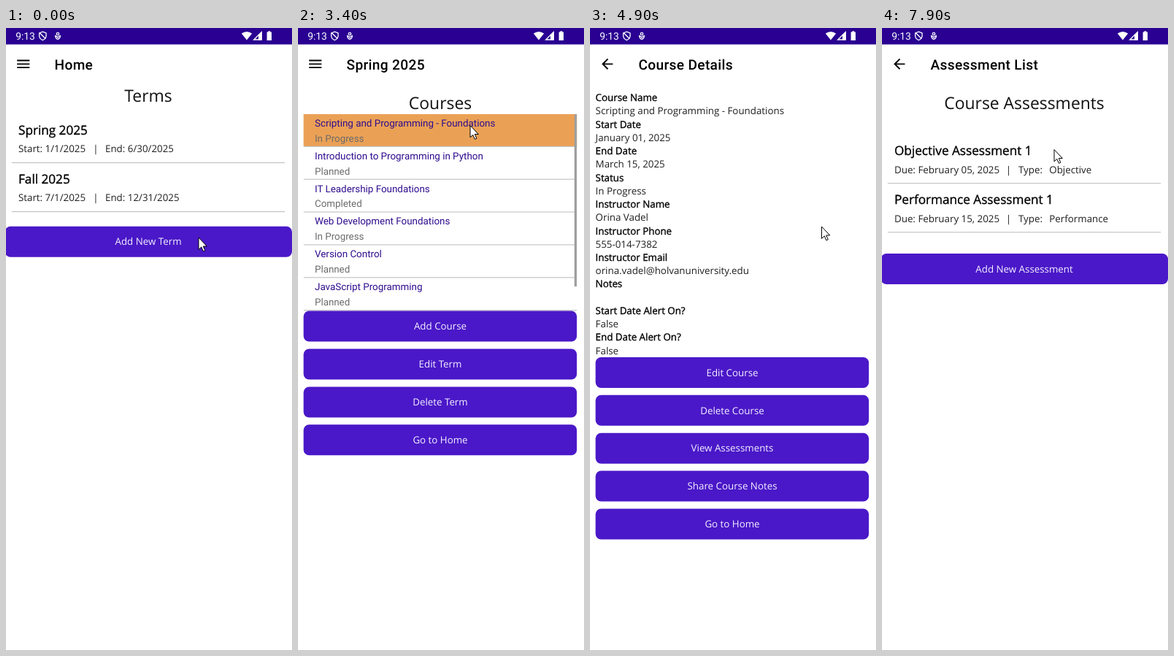
Write an HTML page that moves like this. It is 392 px wide and 852 px high and loops after 8 s.

```html
<!DOCTYPE html>
<html lang="en">
<head>
<meta charset="utf-8">
<title>Course planner</title>
<style>
  html, body { margin: 0; width: 100%; height: 100%; overflow: hidden; background: #fff; }
  svg { display: block; width: 100%; height: 100%; }
  text { font: 13.34px "Open Sans", sans-serif; fill: #1f1f1f; text-rendering: geometricPrecision; white-space: pre; }
  .bar { font: 500 19.1px Roboto, sans-serif; letter-spacing: .35px; fill: #000; }
  .head { font-size: 22.9px; fill: #111; }
  .item { font-size: 17.15px; }
  .item, .label { fill: #000; stroke: #000; stroke-width: .35px; }
  .btn { fill: #f4f0ff; }
  .course { font: 13.4px Roboto, sans-serif; fill: #2f0c8e; }
  .state { font: 13.34px Roboto, sans-serif; fill: #6b6b6b; }
  .clock { font: 13.8px Roboto, sans-serif; fill: #fff; }
</style>
</head>
<body>
<svg id="stage" viewBox="0 0 392 852" preserveAspectRatio="none">
  <g id="home"></g>
  <g id="courses"></g>
  <g id="details"></g>
  <g id="tests"></g>
  <g id="status">
    <rect width="392" height="22.5" fill="#290091"/>
    <text class="clock" x="13.2" y="16">9:13</text>
    <g fill="none" stroke="#fff" stroke-width="1.3">
      <path d="M50.3 5.2L55 7V11Q54.6 15 50.3 16.6Q46 15 45.6 11V7ZM46 6.5L54.3 14.8"/>
      <circle cx="71" cy="8" r="1.7"/>
      <path d="M67.6 10.6Q68 14.6 71 15.3Q74 14.6 74.4 10.6Q72 11 71 13Q70 11 67.6 10.6Z"/>
      <path d="M339.8 16L350.2 5.6V16Z"/>
    </g>
    <path fill="#fff" d="M322.8 7.6Q330 2.4 337.2 7.6L330 16.6ZM346 16.4V9.8L350.6 5.2V16.4ZM359.4 5.4V4.2H362.2V5.4H364V17H357.6V5.4Z"/>
  </g>
  <path id="cursor" d="M0 0V16.4L3.8 12.9L6.3 18.8L8.8 17.8L6.3 12H11.3Z" fill="#fff" stroke="#000"/>
</svg>
<script>
const LOOP = 8000, STEP = 100, W = 392;
const $ = id => document.getElementById(id);

function add(parent, tag, attrs, content) {
  const node = document.createElementNS("http://www.w3.org/2000/svg", tag);
  for (const key in attrs) node.setAttribute(key, attrs[key]);
  if (content) node.textContent = content;
  return parent.appendChild(node);
}
const text = (g, x, y, content, cls = "", anchor = "start") =>
  add(g, "text", { x, y, class: cls, "text-anchor": anchor }, content);
const line = (g, y) =>
  add(g, "rect", { x: 7.8, y: y - .5, width: 374.4, height: 1, fill: "#b9b9b9" });

function button(g, y, label, x = 7.6, width = 374.6) {
  add(g, "rect", { x, y, width, height: 42, rx: 7.6, fill: "#4a18c8" });
  text(g, 195, y + 25.7, label, "btn", "middle");
}
const buttons = (g, y, labels) => labels.forEach((label, i) => button(g, y + i * 51.9, label));

const ICONS = {
  menu: "M3 18h18v-2H3zM3 13h18v-2H3zM3 6v2h18V6z",
  back: "M20 11H7.83l5.59-5.59L12 4l-8 8 8 8 1.41-1.41L7.83 13H20z"
};
function page(id, icon, title) {
  const g = $(id);
  add(g, "rect", { width: W, height: 852, fill: "#fff" });
  add(g, "path", { d: ICONS[icon], transform: "translate(12.3 37.9) scale(.953)" });
  text(g, 66.5, 56.8, title, "bar");
  return g;
}

// Two-line entry: bold name, then details around a divider
function entry(g, y, name, left, barX, right) {
  text(g, 17, y, name, "item");
  text(g, 17, y + 24.4, left);
  text(g, barX, y + 24.4, "|", "", "middle");
  right.forEach(([x, s]) => text(g, x, y + 24.4, s));
  line(g, y + 38.6);
}

const home = page("home", "menu", "Home");
text(home, 195, 101, "Terms", "head", "middle");
entry(home, 146, "Spring 2025", "Start: 1/1/2025", 122.8, [[136, "End: 6/30/2025"]]);
entry(home, 213, "Fall 2025", "Start: 7/1/2025", 122.8, [[136, "End: 12/31/2025"]]);
button(home, 271.7, "Add New Term", -1.5, 393.5);

const courses = page("courses", "menu", "Spring 2025");
text(courses, 195, 110.8, "Courses", "head", "middle");
const picked = add(courses, "rect", { x: 7.6, y: 118, width: 374.6, height: 44, fill: "#e27200" });
[
  ["Scripting and Programming - Foundations", "In Progress"],
  ["Introduction to Programming in Python", "Planned"],
  ["IT Leadership Foundations", "Completed"],
  ["Web Development Foundations", "In Progress"],
  ["Version Control", "Planned"],
  ["JavaScript Programming", "Planned"]
].forEach(([name, state], i) => {
  const y = 118 + i * 44.88;
  text(courses, 23, y + 16.8, name, "course");
  text(courses, 23, y + 37.7, state, "state");
  line(courses, y + 44.3);
});
add(courses, "rect", { x: 378.8, y: 118, width: 3.3, height: 236, fill: "#9f9f9f" });
buttons(courses, 387.6, ["Add Course", "Edit Term", "Delete Term", "Go to Home"]);
const shade = add(courses, "rect", { width: W, height: 852 });

const details = page("details", "back", "Course Details");
[
  ["Course Name", "Scripting and Programming - Foundations"],
  ["Start Date", "January 01, 2025"],
  ["End Date", "March 15, 2025"],
  ["Status", "In Progress"],
  ["Instructor Name", "Orina Vadel"],
  ["Instructor Phone", "555-014-7382"],
  ["Instructor Email", "orina.vadel@holvanuniversity.edu"],
  ["Notes", ""],
  ["Start Date Alert On?", "False"],
  ["End Date Alert On?", "False"]
].forEach(([label, value], i) => {
  const y = 100.2 + i * 36.46;
  text(details, 7.6, y, label, "label");
  text(details, 7.6, y + 18.23, value);
});
buttons(details, 450.9, ["Edit Course", "Delete Course", "View Assessments", "Share Course Notes", "Go to Home"]);

const tests = page("tests", "back", "Assessment List");
text(tests, 195, 110.8, "Course Assessments", "head", "middle");
entry(tests, 174.2, "Objective Assessment 1", "Due: February 05, 2025", 173.3, [[187, "Type:"], [229.3, "Objective"]]);
entry(tests, 241.2, "Performance Assessment 1", "Due: February 15, 2025", 173.3, [[187, "Type:"], [229.3, "Performance"]]);
button(tests, 309, "Add New Assessment", -1.5, 393.5);

// Pointer path: time, x, y
const PATH = [
  [0, 264, 287], [500, 220, 157], [1200, 220, 157], [1800, 229, 145],
  [1900, 229, 145], [2300, 236, 133.5], [4100, 236, 133.5], [4700, 316.5, 271],
  [4800, 316.5, 271], [4900, 317.5, 272], [5200, 317.5, 272], [5300, 357, 560],
  [5400, 259, 593], [5500, 259, 593], [5700, 262, 582.5], [7000, 262, 582.5],
  [7300, 370, 400], [7500, 330, 250], [7700, 227, 147], [7900, 236, 166.5], [8000, 236, 166.5]
];
const clamp = v => Math.min(1, Math.max(0, v));

function pointer(t) {
  const i = PATH.findIndex(k => k[0] > t);
  const [t0, x0, y0] = PATH[i - 1], [t1, x1, y1] = PATH[i];
  const k = (t - t0) / (t1 - t0);
  return [x0 + (x1 - x0) * k, y0 + (y1 - y0) * k];
}
const show = (g, on) => g.setAttribute("display", on ? "inline" : "none");

function update(t) {
  const slide = .5 - Math.cos(Math.PI * clamp((t - 3650) / 250)) / 2;
  const zoom = t < 1300 ? .995 : 1;
  show(home, t < 1200);
  show(courses, t >= 1200 && slide < 1);
  show(details, slide > 0 && t < 6300);
  show(tests, t >= 6300);
  courses.setAttribute("transform",
    `translate(${-W / 2 * slide} 0) translate(195 437) scale(${zoom}) translate(-195 -437)`);
  details.setAttribute("transform", `translate(${W * (1 - slide)} 0)`);
  shade.setAttribute("opacity", slide / 2);
  picked.setAttribute("opacity", clamp((t - 3200) / 300));
  $("cursor").setAttribute("transform", `translate(${pointer(t)})`);
}

const start = performance.now();
function tick() {
  const t = (performance.now() - start + 25) % LOOP;
  update(Math.floor(t / STEP) * STEP);
  requestAnimationFrame(tick);
}
tick();
</script>
</body>
</html>
```
